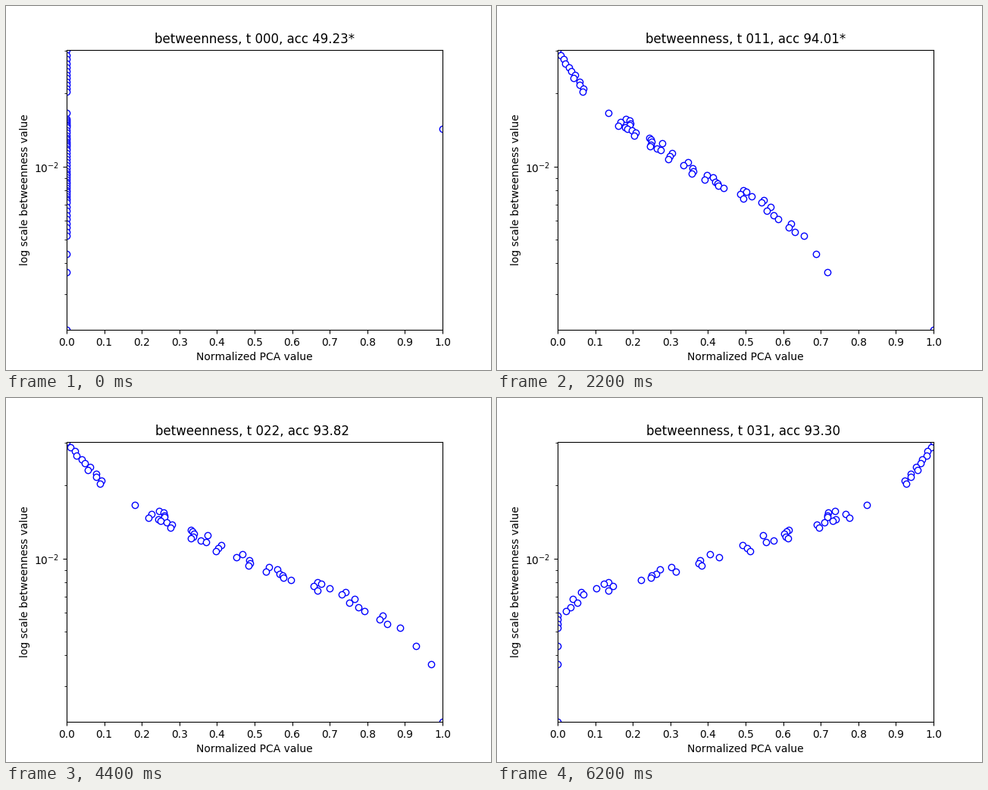
A matplotlib script for the animation above (6.4 s loop, 640x480 px).

```python
import numpy as np
import matplotlib.pyplot as plt
from matplotlib.animation import FuncAnimation
from matplotlib.ticker import MultipleLocator, NullFormatter

STEPS, STEP_MS = 32, 200
COUNT, SEED_NODE = 65, 20
TEN_MILLI_Y, DECADE = 211.9, 320.6     # pixel height of 10^-2, pixels per decade


def to_value(y):
    return 10 ** (-2 + (TEN_MILLI_Y - y) / DECADE)


# Key points of the node curve: rank, height in pixels, settled position.
rank, height, settled = np.array([
    (0, 58, 0), (1, 65, 0.01), (5, 86, 0.05), (11, 113, 0.09),
    (12, 141, 0.185), (13, 149, 0.23), (21, 164, 0.24), (24, 174, 0.33),
    (31, 190, 0.36), (38, 218, 0.49), (53, 259, 0.73), (61, 303, 0.87),
    (63, 351, 0.97), (64, 427.2, 1)]).T
nodes = np.arange(COUNT)
values = to_value(np.interp(nodes, rank, height))
base = np.interp(nodes, rank, settled)
jitter = np.random.default_rng(4).uniform(-1, 1, COUNT)
base += 0.16 * base * (1 - base) * jitter
start = (nodes == SEED_NODE).astype(float)

ACC = np.interp(np.arange(STEPS), [0, 4, 11, 14, 17, 22, 28, 31],
                [49.23, 52.21, 94.01, 94.40, 94.30, 93.82, 93.51, 93.30])


def snap(x, top=0.705, ratio=1.185):
    """Round positions to a geometric ladder of levels."""
    steps = np.round(np.log(np.maximum(x, 1e-3) / top) / np.log(ratio))
    return np.where(x > 0, top * ratio ** steps, 0)


def positions(t):
    # The cloud stretches towards the fixed end node, then bows outwards.
    reach = np.interp(t, [4, 11, 17, 22], [0.67, 0.74, 0.83, 1])
    bow = np.interp(t, [22, 28, 31], [0, 1.35, 1.9])
    x = np.where(base < 1, base * reach, 1)
    x = np.clip(x + bow * x * (1 - x) * (x - 0.2), 0, 1)
    level_pull = np.interp(t, [4, 11], [1, 0])
    x = np.where(base < 1, x + level_pull * (snap(x) - x), 1)
    x = start + (x - start) * min(t / 4, 1)
    return 1 - x if t == STEPS - 1 else x      # the component's sign flips


plt.rcParams.update({"font.family": "DejaVu Sans", "text.kerning_factor": 6})
fig, ax = plt.subplots(figsize=(6.4, 4.8), dpi=100)
ax.set_yscale("log")
ax.set_xlim(0, 1)
ax.set_ylim(to_value(427.2), to_value(57.6))
ax.xaxis.set_major_locator(MultipleLocator(0.1))
ax.yaxis.set_minor_formatter(NullFormatter())
ax.set_xlabel("Normalized PCA value")
ax.set_ylabel("log scale betweenness value")
title = ax.set_title("")
dots, = ax.plot([], [], "bo", markerfacecolor="w")


def update(t):
    dots.set_data(positions(t), values)
    mark = "*" if ACC[t] >= ACC[:t + 1].max() else " "
    title.set_text(f"betweenness, t {t:03d}, acc {ACC[t]:.2f}{mark}")
    return dots, title


anim = FuncAnimation(fig, update, frames=STEPS, interval=STEP_MS,
                     repeat=True, repeat_delay=0)
plt.show()
```
